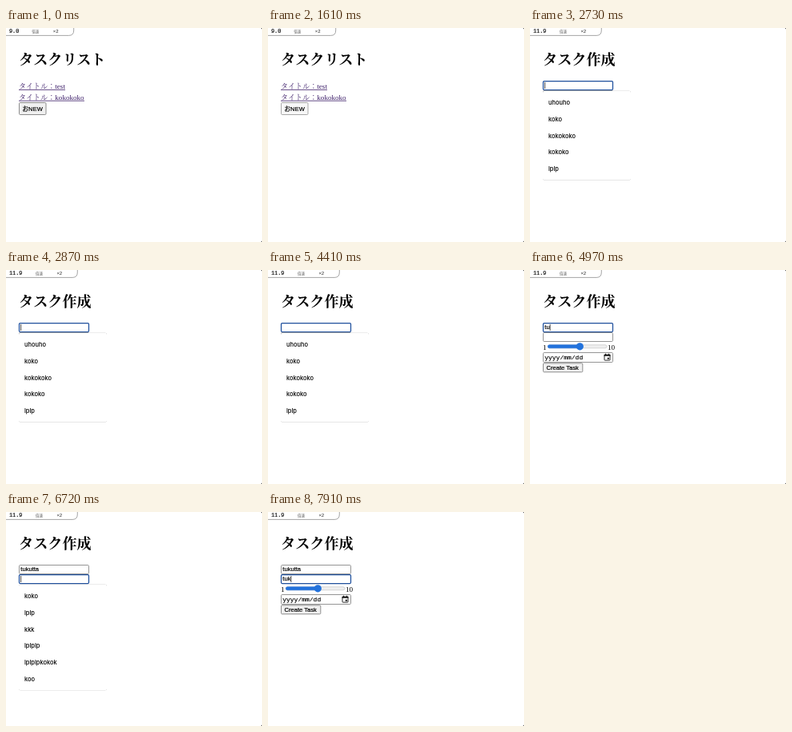
An HTML page that plays this animation: 320x268 px, repeating every 8 s.

```html
<!DOCTYPE html>
<html lang="ja">
<head>
<meta charset="utf-8">
<title>タスク</title>
<style>
  html, body { margin: 0; width: 100%; height: 100%; overflow: hidden; background: #fff; }
  svg { display: block; width: 100%; height: 100%; }
  text { white-space: pre; }
  .heading { font: 700 18.15px "Noto Serif CJK JP", "Noto Sans CJK JP", "Noto Sans CJK", serif; }
  .body { font: 9.1px "Liberation Serif", "Noto Serif CJK JP", "Noto Sans CJK JP", serif; }
  .link { fill: #3b1c68; }
  .control { font: 7.6px "Liberation Sans", "Noto Sans CJK JP", "Noto Sans CJK", sans-serif; stroke: #000; stroke-width: .2; }
  .date { font: 8px "Liberation Mono", monospace; stroke: #000; stroke-width: .15; }
  .option { font: 500 7.45px Inter, sans-serif; }
  .badge { font: 6.8px "Liberation Mono", monospace; stroke: #000; stroke-width: .15; }
  .unit { font: 4.5px "Noto Sans CJK JP", "Noto Sans CJK", sans-serif; fill: #555; }
  .speed { font: 5.8px "Liberation Mono", monospace; fill: #222; }
  .menu { fill: #fff; filter: drop-shadow(0 .7px .7px #0006); }
</style>
</head>
<body>
<svg id="stage" viewBox="0 0 320 268"></svg>
<script>
const LOOP = 8000;
const FORM_AT = 1820;
const stage = document.getElementById('stage');
const pen = document.createElement('canvas').getContext('2d');
pen.font = '7.6px "Liberation Sans", sans-serif';

// Each field: when it gains and loses focus, keystroke times, caret-off spans, menu states.
const fields = [
  { y: 66, focus: [2730, 6720], word: 'tukutta',
    keys: [4830, 4970, 5180, 5390, 5530, 5670, 5740],
    caretOff: [[3360, 3850], [4410, 4830], [6300, 6720]],
    menus: [{ span: [2730, 4830], options: ['uhouho', 'koko', 'kokokoko', 'kokoko', 'lplp'] }] },
  { y: 78, focus: [6720, LOOP], word: 'tuk',
    keys: [7490, 7630, 7910],
    caretOff: [[7210, 7490]],
    menus: [
      { span: [6720, 7490], options: ['koko', 'lplp', 'kkk', 'lplplp', 'lplplpkokok', 'koo'] },
      { span: [7490, 7630], options: ['test'] }
    ] }
];

const within = (t, [from, to]) => t >= from && t < to;
const text = (x, y, style, content) => `<text x="${x}" y="${y}" class="${style}">${content}</text>`;
const box = (x, y, w, h, fill = '#fff', stroke = '#8a8a8a', weight = .9, r = 1.2) =>
  `<rect x="${x}" y="${y}" width="${w}" height="${h}" rx="${r}" fill="${fill}" stroke="${stroke}" stroke-width="${weight}"/>`;

function button(y, w, h, label, pressed) {
  return box(16.5, y, w, h, pressed ? '#f7f7f7' : '#f0f0f0', pressed ? '#a0a0a0' : '#808080')
    + text(20.5, y + h / 2 + 2.5, 'control', label);
}

function link(baseline, name) {
  const label = 'タイトル：' + name;
  const width = { test: 58, kokokoko: 82 }[name];
  return text(16, baseline, 'body link', label)
    + `<path d="M16 ${baseline + 1.4}h${width}" stroke="#3b1c68" stroke-width=".8"/>`;
}

function listPage(t) {
  return text(16, 45.8, 'heading', 'タスクリスト')
    + link(76, 'test') + link(89.8, 'kokokoko')
    + button(93.5, 33.5, 15, 'おNEW', t >= 1610);
}

function field(t, { y, focus, word, keys, caretOff }) {
  const focused = within(t, focus);
  const typed = word.slice(0, keys.filter(k => t >= k).length);
  let out = box(16.5, y + .5, 87, 11, '#fff', ...(focused ? ['#1f4f9c', 1.25] : []));
  out += text(18.3, y + 8.4, 'control', typed);
  if (focused && !caretOff.some(span => within(t, span))) {
    const x = 18.4 + pen.measureText(typed).width;
    out += `<rect x="${x}" y="${y + 2}" width=".7" height="8"/>`;
  }
  return out;
}

function slider() {
  return text(16, 100, 'body', '1') + text(97, 100, 'body', '10')
    + box(22.3, 93.8, 73.6, 4, '#efefef', '#bbb', .6, 2)
    + box(22.3, 93.8, 40, 4, '#2272dc', '#2272dc', .6, 2)
    + '<circle cx="62.3" cy="95.8" r="4.6" fill="#2272dc"/>';
}

function dateField() {
  return box(16.5, 103.5, 87, 12)
    + text(18.2, 112, 'date', 'yyyy/mm/dd')
    + box(93, 106.3, 7, 6.8, 'none', '#111', .9, .6)
    + '<path d="M92.6 105.8h7.8v2h-7.8zM94 104.8h1v2h-1zM98 104.8h1v2h-1zM96.8 109.8h2v2h-2z" fill="#111"/>';
}

function menu(t, { y, menus }) {
  const open = menus.find(m => within(t, m.span));
  if (!open) return '';
  const top = y + 12.7;
  const pitch = 20.65;
  return `<rect class="menu" x="16" y="${top}" width="110" height="${open.options.length * pitch + 8.6}" rx="2"/>`
    + open.options.map((o, i) => text(23, top + 17.6 + i * pitch, 'option', o)).join('');
}

function formPage(t) {
  return text(16, 45.8, 'heading', 'タスク作成')
    + slider() + dateField() + button(116.8, 49.3, 11, 'Create Task')
    + fields.map(f => field(t, f)).join('')
    + fields.map(f => menu(t, f)).join('');
}

function badge(t) {
  if (within(t, [FORM_AT, 2100])) return '';
  const time = t < FORM_AT ? '9.0' : '11.9';
  const shift = t < FORM_AT ? 0 : 4.6;
  return `<path d="M-1 -1V9.4H${78.5 + shift}q6.2 0 6.2 -6.4V-1Z" fill="#fff" stroke="#9a9a9a" stroke-width=".9"/>`
    + text(4, 6, 'badge', time)
    + text(32.3 + shift, 5.6, 'unit', '倍速')
    + text(58.8 + shift, 5.9, 'speed', '×2');
}

const corners = '<path d="M318.6 0H320V1.4ZM318.6 268H320V266.6Z" fill="#555"/>';

let shown = '';
function draw() {
  const t = performance.now() % LOOP;
  const picture = (t < FORM_AT ? listPage(t) : formPage(t)) + badge(t) + corners;
  if (picture !== shown) stage.innerHTML = shown = picture;
  requestAnimationFrame(draw);
}
draw();
</script>
</body>
</html>
```
